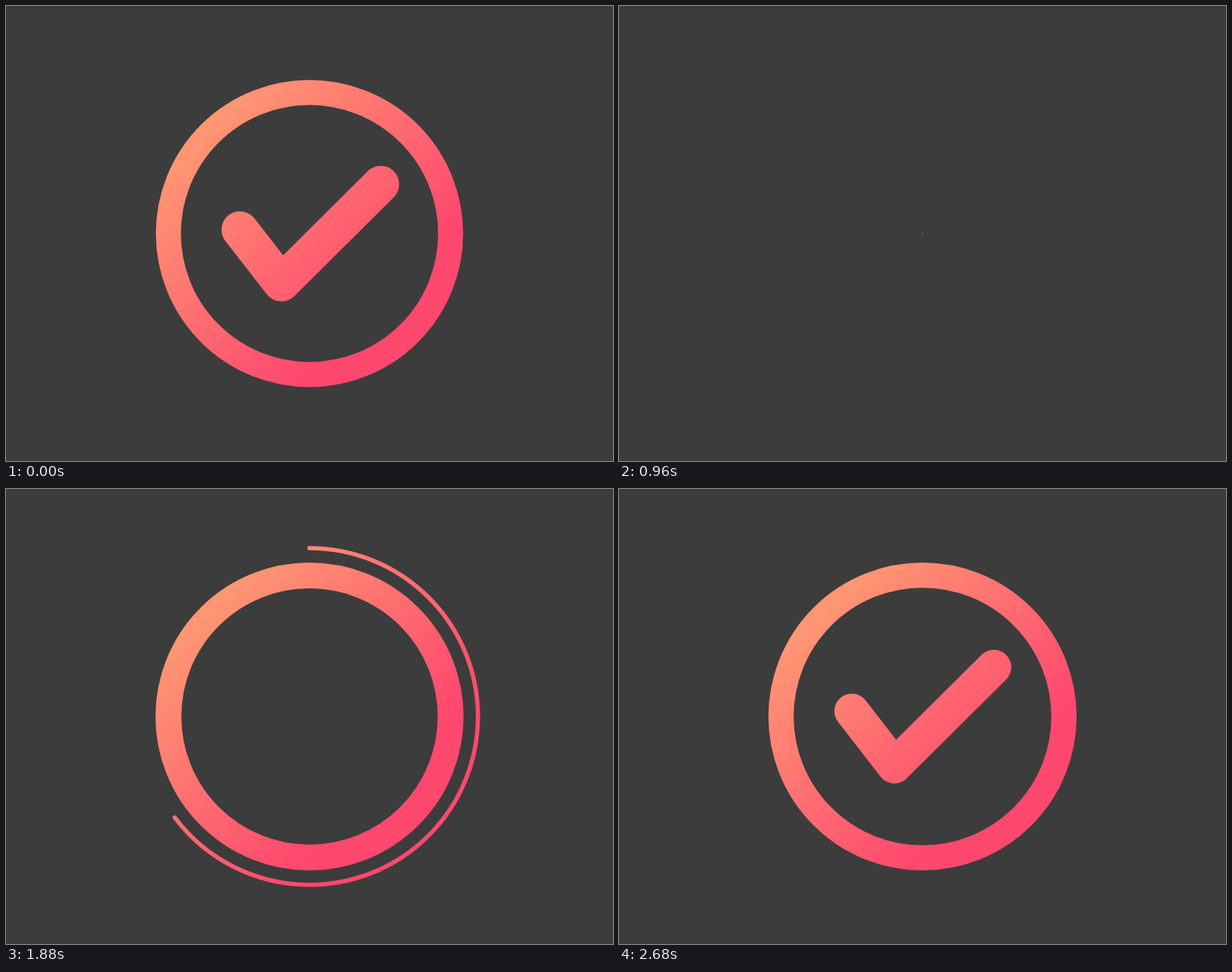
Animation of 800x600 px, one loop 2.72 s. Source, as an HTML page with a canvas:

```html
<!DOCTYPE html>
<html>
<head>
<meta charset="utf-8">
<style>
  html, body { margin: 0; height: 100%; overflow: hidden; background: #3c3c3c; }
  canvas { display: block; }
</style>
</head>
<body>
<canvas id="stage" width="800" height="600"></canvas>
<script>
const ctx = document.getElementById('stage').getContext('2d');
const LOOP = 2720, RADIUS = 186, WIDTH = 33;
const START = [-91.7, -5], ELBOW = [-37, 65.3], END = [94, -65];
const FIRST = [-94.5, -9], HOOK = [-102.5, 4.5];

const span = (t, a, b) => Math.min(1, Math.max(0, (t - a) / (b - a)));
const smooth = u => u * u * (3 - 2 * u);
const mix = (a, b, u) => a + (b - a) * u;
const mixPoint = (p, q, u) => [mix(p[0], q[0], u), mix(p[1], q[1], u)];

// Symmetric S-curve: cubic-bezier(k, 0, 1 - k, 1)
function sCurve(x, k) {
  let lo = 0, hi = 1;
  for (let i = 0; i < 24; i++) {
    const m = (lo + hi) / 2, n = 1 - m;
    if (3 * n * n * m * k + 3 * n * m * m * (1 - k) + m * m * m < x) lo = m; else hi = m;
  }
  return smooth(lo);
}

function ringScale(t) {
  if (t < 1031) return 1 - sCurve(t / 1031, 0.52);
  if (t < 1215) return span(t, 1031, 1215) ** 1.25;
  const s = (t - 1215) / 1000;
  return 1 + 0.207 * Math.sin(3 * Math.PI * s) * Math.exp(-3 * s);
}

function setStroke(r, width) {
  const from = -0.73 * r, to = 0.48 * r;
  const paint = ctx.createLinearGradient(from, from, to, to);
  paint.addColorStop(0, '#ff9673');
  paint.addColorStop(1, '#ff486e');
  ctx.strokeStyle = paint;
  ctx.lineWidth = width;
}

function arc(r, width, portion) {
  if (r <= 0 || width <= 0 || portion <= 0) return;
  setStroke(r, width);
  ctx.beginPath();
  ctx.arc(0, 0, r, -Math.PI / 2, (portion * 2 - 0.5) * Math.PI);
  if (portion === 1) ctx.closePath();
  ctx.stroke();
}

function polyline(points, width) {
  setStroke(RADIUS, width);
  ctx.beginPath();
  points.forEach(p => ctx.lineTo(...p));
  ctx.stroke();
}

function drawCheck(t) {
  if (t < 400) {
    const left = 1 - smooth(t / 400), bend = 0.32;
    const elbow = mixPoint(START, ELBOW, Math.min(1, left / bend));
    const tip = mixPoint(elbow, END, span(left, bend, 1));
    polyline([START, elbow, tip], 48.5 * Math.min(1, left * 2));
  } else if (t > 2040) {
    const start = mixPoint(FIRST, START, span(t, 2120, LOOP) ** 11);
    const hook = mixPoint(start, HOOK, span(t, 2040, 2120));
    const elbow = mixPoint(hook, ELBOW, smooth(span(t, 2120, 2330)));
    const tip = mixPoint(elbow, END, smooth(span(t, 2260, 2600)));
    polyline([start, elbow, tip], 48.5 * span(t, 1954, LOOP));
  }
}

function draw(now) {
  const t = now % LOOP, scale = ringScale(t);
  ctx.setTransform(1, 0, 0, 1, 0, 0);
  ctx.fillStyle = '#3c3c3c';
  ctx.fillRect(0, 0, 800, 600);
  ctx.translate(400, 300);
  ctx.lineCap = ctx.lineJoin = 'round';

  const extra = t < 1031 ? 0 : 3.6 * Math.exp((1320 - t) / 480);
  arc(RADIUS * scale, (WIDTH + extra) * scale, 1);

  const inward = span(t, 1974, 2524) ** 2;
  arc(mix(222, RADIUS, inward), (t - 1485) * 0.0142, smooth(span(t, 1442, 2174)));

  ctx.save();
  if (t < 400) ctx.scale(scale, scale);
  drawCheck(t);
  ctx.restore();
}

function tick() {
  draw(performance.now());
  requestAnimationFrame(tick);
}
tick();
</script>
</body>
</html>
```
